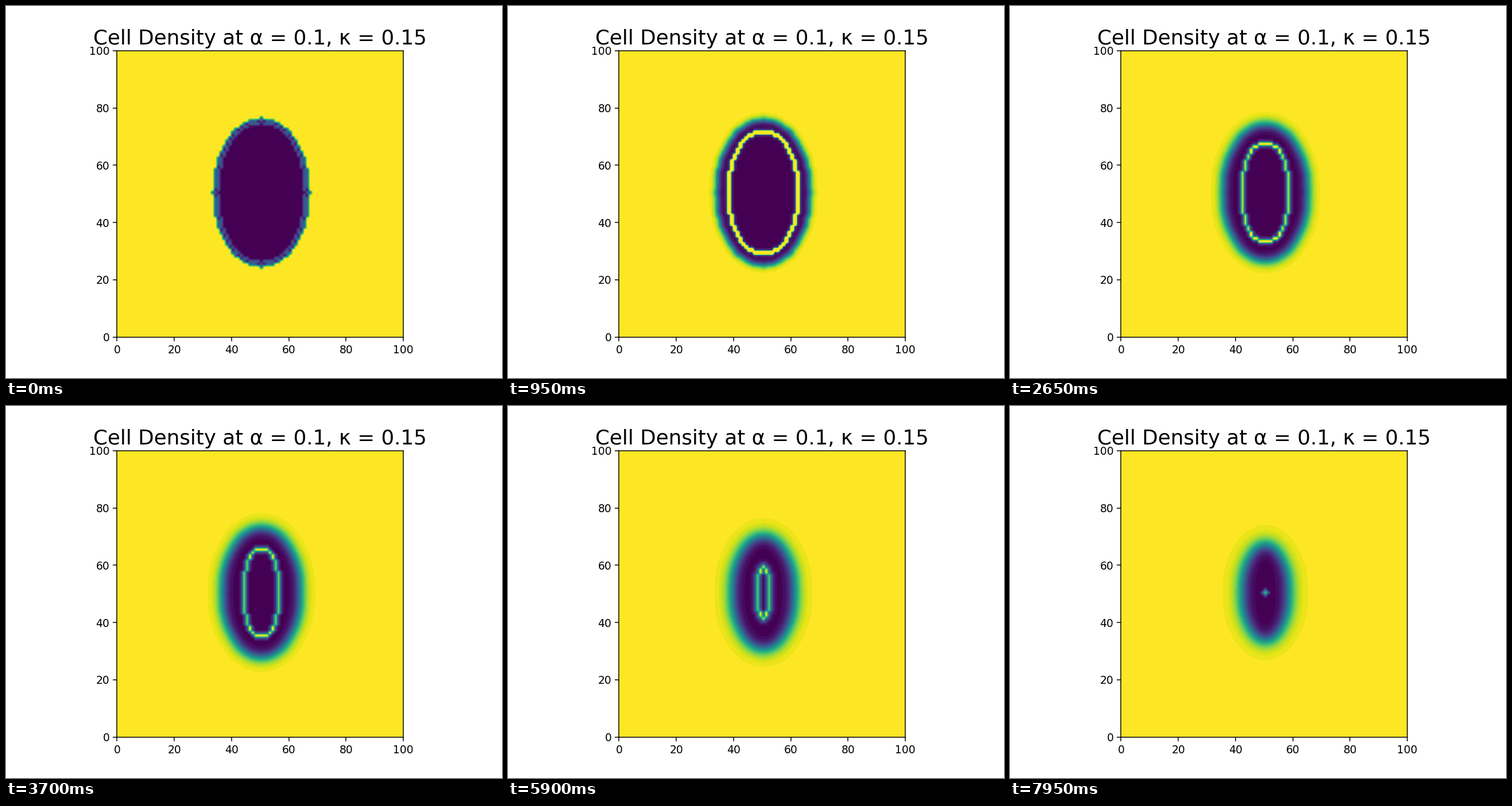
Recreate the animation shown at these times as a matplotlib script. Size 864 px wide and 648 px high, loop 8 s.

```python
import numpy as np
import matplotlib.pyplot as plt
from matplotlib.animation import FuncAnimation
from matplotlib.colors import ListedColormap

FRAMES, SIZE, MID = 160, 100, 50
DIFFUSION, GROWTH = 0.03, 0.049
LEVELS = 32

yy, xx = np.mgrid[:SIZE, :SIZE] - MID
ax_x, ax_y = np.abs(xx), np.abs(yy)


def shift(a, dx, dy):
    return np.roll(a, (dy, dx), (0, 1))


def around(a, step=1):
    return [shift(a, step, 0), shift(a, -step, 0),
            shift(a, 0, step), shift(a, 0, -step)]


def wound_rim(n):
    """Two-cell rim inside the wound, with gaps at the stair corners."""
    rim = (n == 0) & (np.max(around(n, 2), axis=0) > 0)
    cross = (shift(n, 1, 1) + shift(n, -1, -1)
             - shift(n, 1, -1) - shift(n, -1, 1))
    edge = np.max(around(n), axis=0) > 0
    tip = (n == 0) & (np.sum(around(n), axis=0) == 3)
    return 0.28 * ((rim & ~(edge & (cross != 0))) | tip)


def grow(n):
    lap = sum(around(n)) - 4 * n
    return n + DIFFUSION * lap + GROWTH * n * (1 - n)


def ring_layer(k):
    """One-cell outline of the leading edge after k inward steps."""
    a = max(16.65 - k, 0.6)
    b = np.interp(k, [0, 10, 12, 16, 17], [25, 15, 12, 5, 0]) + 0.6
    power = 1.97 + 0.035 * k
    inside = (ax_x / a) ** power + (ax_y / b) ** power <= 1
    outline = inside & ~np.all(around(inside), axis=0)
    amp = np.interp(k, [4, 8, 10, 16, 17], [2, 0.95, 0.82, 0.75, 0.75])
    return outline * np.where(ax_y > 0.75 * b, amp + 0.25, amp)


layers = [ring_layer(k) for k in range(18)]


def ring(t):
    depth = np.interp(t, [0, 19, 53, 74, 99, 139, 159],
                      [1, 4, 8, 10, 12, 16, 17])
    out = np.zeros((SIZE, SIZE))
    for k, layer in enumerate(layers):
        weight = np.clip(1.5 * (1 - abs(depth - k)), 0, 1)
        out = np.maximum(out, weight * layer)
    glow = 0.4 * t / FRAMES * np.max(around(out), axis=0)
    return np.maximum(out, glow) * min(1, t / 4)


def simulate():
    n = ((xx / 17) ** 2 + (yy / 26) ** 2 > 1).astype(float)
    rim, out = wound_rim(n), []
    for t in range(FRAMES):
        fading = rim * np.exp(-t / 6)
        out.append(np.max([n, fading, ring(t)], axis=0))
        n = grow(n)
    return out


density = simulate()

fig, ax = plt.subplots(figsize=(6.4, 4.8), dpi=135)
cmap = ListedColormap(plt.get_cmap("viridis")(np.linspace(0, 1, LEVELS + 1)))
half = 0.5 / LEVELS
image = ax.imshow(density[0], cmap=cmap, vmin=-half, vmax=1 + half,
                  origin="lower", extent=(0, SIZE, 0, SIZE),
                  interpolation="bilinear")
ax.set_title("Cell Density at α = 0.1, κ = 0.15", fontsize=19)
ax.set_xticks(range(0, 101, 20))
ax.set_yticks(range(0, 101, 20))


def update(i):
    image.set_data(density[i])
    return [image]


anim = FuncAnimation(fig, update, frames=FRAMES, interval=50,
                     init_func=lambda: update(0), repeat=True, repeat_delay=0)
plt.show()
```
